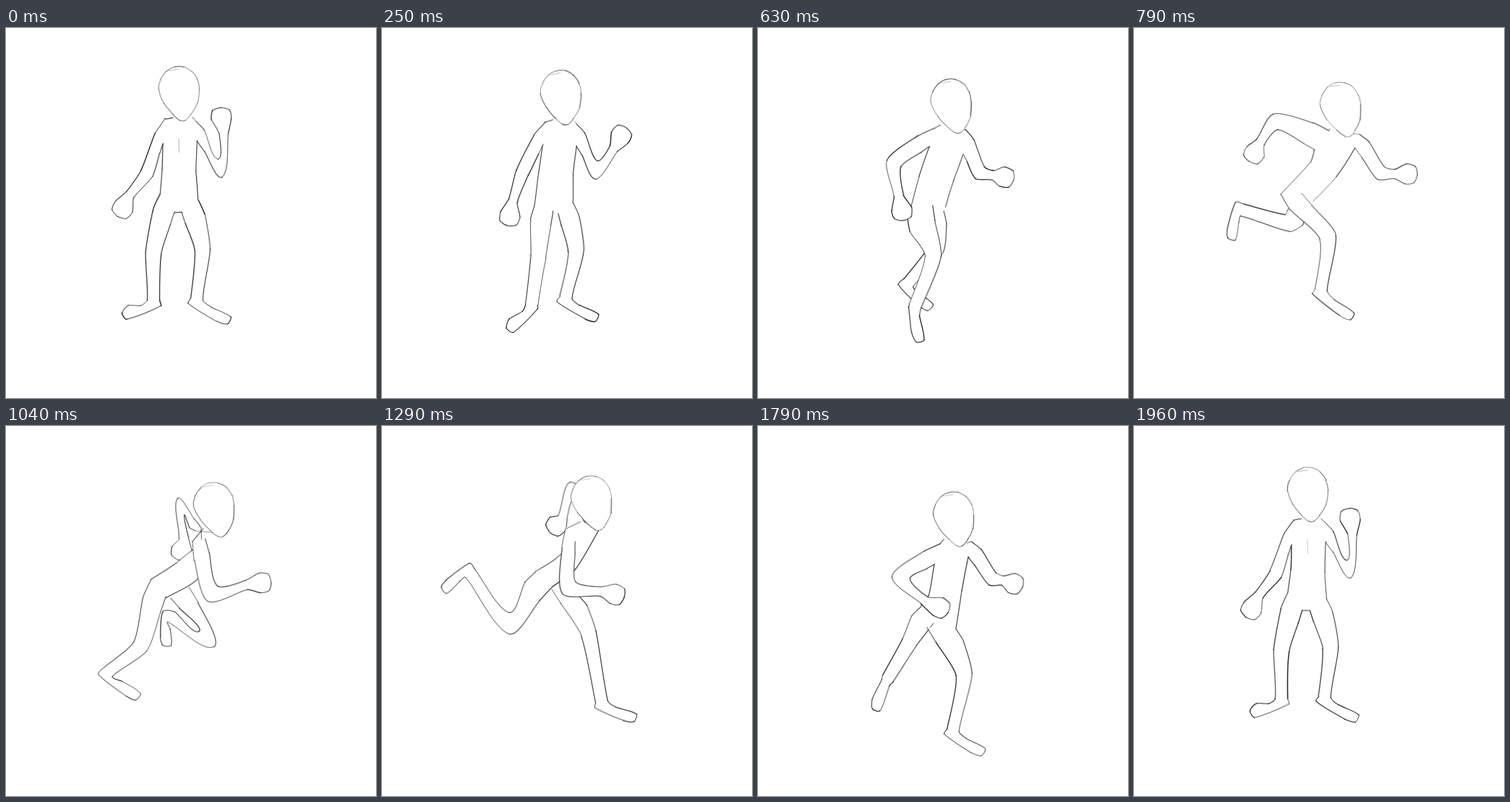
These frames come from a looping animation (512 px wide and 512 px high, 2040 ms). An HTML page with a canvas:

```html
<!DOCTYPE html>
<html lang="en">
<head>
<meta charset="utf-8">
<title>Run cycle sketch</title>
<style>
html, body { margin: 0; width: 100%; height: 100%; overflow: hidden; background: #fff; }
canvas { display: block; width: 100%; height: 100%; }
</style>
</head>
<body>
<canvas id="stage" width="512" height="512"></canvas>
<script>
const ctx = document.getElementById('stage').getContext('2d');
const LOOP = 2040;
const FIRST_HOLD = 130;
const BEAT = 250 / 3;

const parse = s => s.split(' ').map(p => p.split(',').map(Number));
const lerp = (a, b, u) => a + (b - a) * u;
const clamp = (x, lo, hi) => Math.max(lo, Math.min(hi, x));
const mix = (p, q, u) => [lerp(p[0], q[0], u), lerp(p[1], q[1], u)];
const mixAll = (P, Q, u) => P.map((p, i) => mix(p, Q[i], u));
const add = (p, q) => [p[0] + q[0], p[1] + q[1]];
const sub = (p, q) => [p[0] - q[0], p[1] - q[1]];
const move = (p, d, k) => [p[0] + d[0] * k, p[1] + d[1] * k];
const size = v => Math.hypot(v[0], v[1]);
const angle = v => Math.atan2(v[1], v[0]);
const polar = (a, r) => [Math.cos(a) * r, Math.sin(a) * r];
const unit = v => polar(angle(v), 1);
const side = v => [-v[1], v[0]];

// Body: head corner, back of waist, front of waist, groin.
// Limb: both sides of its root, joint, wrist or ankle, middle of fist or toe.
const LIMBS = ['nearArm', 'farArm', 'nearLeg', 'farLeg'];
function pose(time, turn, shade, body, ...limbs) {
  const p = { time, turn, shade, body: parse(body) };
  LIMBS.forEach((name, i) => p[name] = parse(limbs[i]));
  return p;
}

const stand = pose(40, 0, .85, '212,53 216,195 263,198 266,238',
  '220,126 217,160 195,201 172,230 162,249',
  '264,156 262,128 296,194 301,146 298,124',
  '213,230 233,255 204,311 204,377 162,399',
  '243,255 266,238 272,307 264,375 310,406');

const crouch = pose(540, 1, .95, '235,69 218,210 268,213 262,250',
  '238,138 234,163 194,197 210,242 218,262',
  '279,177 281,139 299,200 316,204 331,207',
  '208,274 244,250 237,320 209,387 207,436',
  '246,262 262,250 262,314 239,367 279,394');

const stride = pose(790, 1, .7, '258,75 244,186 280,206 248,240',
  '270,142 250,168 196,130 175,158 167,173',
  '306,166 312,147 342,201 361,202 378,202',
  '203,230 232,228 268,289 259,363 303,401',
  '214,250 236,266 212,270 150,252 134,293');

const push = pose(1040, 1, .75, '260,78 235,190 268,208 221,238',
  '258,160 276,156 286,232 333,220 353,217',
  '270,140 262,145 242,112 246,155 243,172',
  '201,212 221,236 186,305 142,340 184,376',
  '228,238 252,222 277,295 228,264 222,305');

const leap = pose(1290, 1, .75, '262,69 240,184 268,198 236,222',
  '254,142 267,160 259,224 303,229 322,233',
  '310,126 290,140 263,90 250,126 242,137',
  '212,202 236,222 176,273 122,204 84,228',
  '235,226 273,236 286,287 304,382 352,405');

const land = pose(1540, 1, .82, '236,78 229,222 275,215 267,268',
  '245,150 237,178 191,197 223,228 244,238',
  '284,168 288,147 318,199 331,201 346,205',
  '226,262 246,278 224,280 180,304 197,350',
  '227,266 267,268 278,331 263,408 306,440');

const shift = (p, d, names) =>
  Object.assign({ ...p }, ...names.map(n => ({ [n]: p[n].map(q => add(q, d)) })));

const settle = { ...shift(stand, [1, 4], ['body', 'nearArm', 'farArm']), time: 1960 };
const brake = { ...shift(land, [7, 13], ['body', ...LIMBS]), time: 1790, turn: .8 };
brake.nearLeg = swing(brake.nearLeg, settle.nearLeg, .5);

const KEYS = [stand, crouch, stride, push, leap, land, brake, settle];

// Bones turn the short way round and change length evenly
function swing(P, Q, u) {
  const out = mixAll(P.slice(0, 2), Q.slice(0, 2), u);
  let p = mix(P[0], P[1], .5), q = mix(Q[0], Q[1], .5), at = mix(p, q, u);
  for (let i = 2; i < 5; i++) {
    const v = sub(P[i], p), w = sub(Q[i], q);
    const d = angle(w) - angle(v);
    const a = angle(v) + Math.atan2(Math.sin(d), Math.cos(d)) * u;
    at = add(at, polar(a, lerp(size(v), size(w), u)));
    out.push(at);
    p = P[i];
    q = Q[i];
  }
  return out;
}

function poseAt(time) {
  if (time <= stand.time) return stand;
  const i = KEYS.findIndex(k => k.time >= time);
  if (i < 0) return settle;
  const A = KEYS[i - 1], B = KEYS[i];
  let u = (time - A.time) / (B.time - A.time);
  if (A === crouch) u **= 1.6;
  const p = { turn: lerp(A.turn, B.turn, u), shade: lerp(A.shade, B.shade, u), body: mixAll(A.body, B.body, u) };
  for (const name of LIMBS) p[name] = swing(A[name], B[name], u);
  return p;
}

// Points from the side of the bone round the fist and back
function fist(tip, dir) {
  return [1.8, .95, .1, -.75, -1.65].map((t, i) => add(tip, polar(angle(dir) + t, i % 2 ? 15.5 : 14)));
}

// The heel stands out on the side the foot turns away from
function foot(ankle, toe, shin) {
  const v = sub(toe, ankle), d = unit(v), n = side(d);
  const bend = shin[0] * d[1] - shin[1] * d[0];
  const at = (f, w) => move(move(ankle, v, f), n, w);
  const heel = s => {
    const h = clamp(.6 - s * bend * .5, .15, 1.1);
    return at(.5 - .6 * h, s * 11 * h);
  };
  return [heel(1), at(.72, 10), at(.98, 5), at(.95, -6), heel(-1)];
}

function outline([a, b, joint, end, tip], isLeg, outer) {
  const d1 = unit(sub(joint, mix(a, b, .5))), d2 = unit(sub(end, joint));
  const n1 = side(d1), n2 = side(d2), n = unit(add(n1, n2));
  const [wide, thin] = isLeg ? [10.5, 8.5] : [9, 6.5];
  const reach = wide * Math.min(1.4, 1 / Math.abs(n[0] * n1[0] + n[1] * n1[1]));
  const flank = (root, s) => {
    const bend = move(joint, n, s * reach);
    const swell = move(mix(root, bend, .3), n1, s * (s === outer ? 4 : 0));
    return [root, swell, bend, move(end, n2, s * thin)];
  };
  const last = isLeg ? foot(end, tip, d2) : fist(tip, unit(sub(tip, end)));
  return [...flank(a, 1), ...last, ...flank(b, -1).reverse()];
}

function headShape(corner, turn) {
  return Array.from({ length: 14 }, (_, i) => {
    const t = i / 14 * Math.PI * 2, s = Math.sin(t), low = Math.max(0, s);
    const x = 27.5 + 28 * Math.cos(t) * (1 - .45 * low * low) + (5 + 5 * turn) * low;
    return add(corner, [x, 32 + s * (s > 0 ? 44 : 32)]);
  });
}

let seed = 1;
function rand() {
  seed = (seed * 16807) % 2147483647;
  return seed / 2147483647;
}
const wobble = (p, r) => [p[0] + (rand() - .5) * r, p[1] + (rand() - .5) * r];

// Bezier pieces through the points, nearly straight with soft corners
function pieces(pts, closed) {
  const n = pts.length, k = closed ? .33 : .22;
  const at = i => closed ? pts[(i + n) % n] : pts[clamp(i, 0, n - 1)];
  const out = [];
  for (let i = 0; i < (closed ? n : n - 1); i++) {
    const p = at(i), q = at(i + 1), len = size(sub(q, p)) * k;
    out.push([p, move(p, unit(sub(q, at(i - 1))), len), move(q, unit(sub(p, at(i + 2))), len), q]);
  }
  return out;
}

function fill(pts, closed) {
  ctx.beginPath();
  ctx.moveTo(...pts[0]);
  for (const [, b, c, d] of pieces(pts, closed)) ctx.bezierCurveTo(...b, ...c, ...d);
  ctx.fillStyle = '#fff';
  ctx.fill();
}

function pencil(pts, shade, closed) {
  const parts = pieces(pts, closed);
  for (const pass of [0, 1]) {
    for (const part of parts) {
      const [a, b, c, d] = part.map(p => wobble(p, pass ? 2.6 : .7));
      ctx.beginPath();
      ctx.moveTo(...a);
      ctx.bezierCurveTo(...b, ...c, ...d);
      ctx.lineWidth = pass ? .8 : .9 + rand() * .5;
      ctx.strokeStyle = `rgba(25,25,25,${shade * (pass ? .35 : .6 + rand() * .5)})`;
      ctx.stroke();
    }
  }
}

function drawLimb(p, name) {
  const pts = outline(p[name], name.endsWith('Leg'), name.startsWith('near') ? 1 : -1);
  fill(pts);
  pencil(pts, p.shade);
}

function drawTorso(p) {
  const [head, back, front, groin] = p.body;
  const [shoulder, armpit] = p.nearArm, [farPit, farShoulder] = p.farArm;
  const nape = add(head, mix([19, 71], [13, 64], p.turn));
  const throat = add(head, [46, 71]);
  const rear = [armpit, back, p.nearLeg[0]], fore = [farPit, front, groin];
  fill([nape, shoulder, ...rear, ...[...fore].reverse(), farShoulder, throat]);
  pencil([nape, shoulder], p.shade * .8);
  pencil([throat, farShoulder], p.shade * .5);
  pencil(rear, p.shade);
  pencil(fore, p.shade);
}

function drawHead(p) {
  const head = p.body[0], pts = headShape(head, p.turn);
  fill(pts, true);
  pencil(pts, p.shade * .62, true);
  pencil([add(head, [13, 6]), add(head, [27, 4])], .25);
  if (p.turn > .6) pencil([pts[0], pts[1]], .4);
}

function draw(time) {
  const p = poseAt(time);
  seed = 977 + time * 13;
  ctx.fillStyle = '#fff';
  ctx.fillRect(0, 0, 512, 512);
  ctx.lineCap = ctx.lineJoin = 'round';
  const legs = ['farLeg', 'nearLeg'];
  if (time > 1450) legs.reverse();
  drawLimb(p, 'farArm');
  drawLimb(p, legs[0]);
  drawTorso(p);
  drawLimb(p, legs[1]);
  drawLimb(p, 'nearArm');
  if (p.turn < .3) {
    pencil([p.nearLeg[1], p.farLeg[0]], p.shade);
    pencil([add(p.body[0], [27, 100]), add(p.body[0], [28, 119])], .25);
  }
  drawHead(p);
}

// Drawings change on a steady beat, rounded to whole hundredths of a second
function stepTime(t) {
  if (t < FIRST_HOLD) return 0;
  const at = n => Math.round((FIRST_HOLD + n * BEAT) / 10 - .17) * 10;
  let n = Math.floor((t - FIRST_HOLD) / BEAT) + 1;
  while (at(n) > t) n--;
  return at(n);
}

let shown = -1;
const start = performance.now();
function tick() {
  const time = stepTime((performance.now() - start) % LOOP);
  if (time !== shown) draw(shown = time);
  requestAnimationFrame(tick);
}
tick();
</script>
</body>
</html>
```
